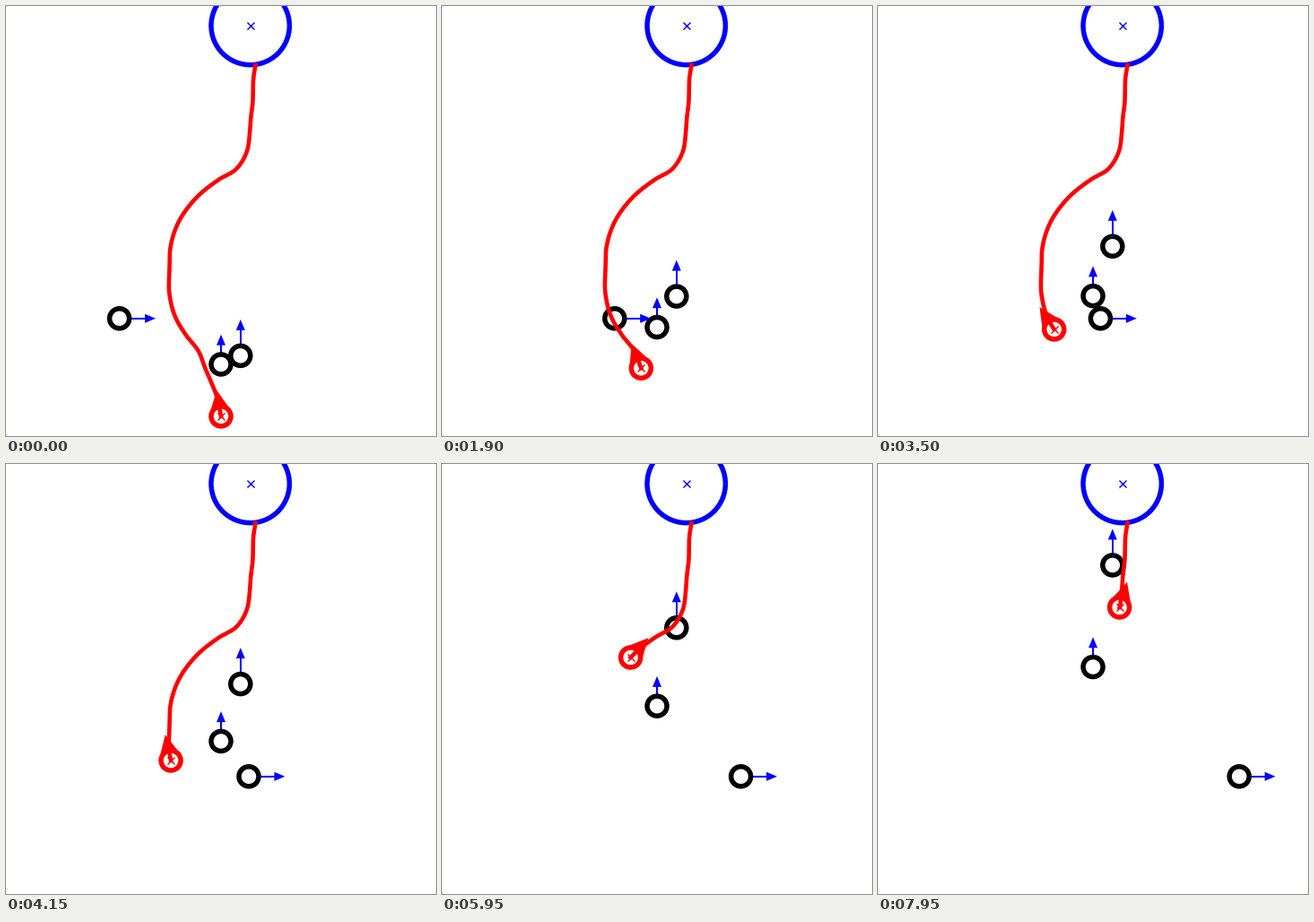
Animation, 480 px wide and 480 px high, one loop 8 s. Source, as a matplotlib script:

```python
import numpy as np
import matplotlib.pyplot as plt
from matplotlib.animation import FuncAnimation
from matplotlib.patches import Circle, Polygon

SIZE, DPI = 480, 100
PX = 72 / DPI
FRAMES, INTERVAL = 160, 50
RADIUS = 11

# Bends of the planned route, from the robot's start up to the goal
ROUTE = np.array([
    (240, 458), (237.6, 444), (222.3, 404.3), (215, 385.5), (201, 367.5),
    (188.5, 346), (182.5, 322), (182.6, 290), (183.2, 272), (191, 244.5),
    (211, 215.5), (238, 193.5), (257, 182), (268.5, 163.5), (272.2, 141),
    (273.2, 126), (275.2, 110), (276.5, 78), (278.5, 66)])

# The robot's changes of pace: time in frames, height reached
PACE_T, PACE_Y = np.array([
    (0, 458), (17, 438), (38, 404.3), (56, 383.3), (83, 331),
    (101, 278), (119, 216), (138, 187.3), (159, 160)]).T

# Obstacles: start and velocity per frame
MOVERS = [((240, 400), (0, -1.091)),
          ((261.8, 390.4), (0, -1.745)),
          ((126.6, 348.8), (1.74, 0))]


def hermite(x, xs, ys):
    """Smooth cubic curve through the points (xs, ys)."""
    slope = np.gradient(ys, xs)
    i = np.clip(np.searchsorted(xs, x, side="right") - 1, 0, len(xs) - 2)
    h = xs[i + 1] - xs[i]
    u = (x - xs[i]) / h
    return ((1 + 2 * u) * (1 - u) ** 2 * ys[i] + u * (1 - u) ** 2 * h * slope[i]
            + u * u * (3 - 2 * u) * ys[i + 1] + u * u * (u - 1) * h * slope[i + 1])


def lengths(pts):
    steps = np.hypot(*np.diff(pts, axis=0).T)
    return np.concatenate(([0], np.cumsum(steps)))


chord = lengths(ROUTE)
fine = np.linspace(0, chord[-1], 900)
path = np.column_stack([hermite(fine, chord, axis) for axis in ROUTE.T])
arc = lengths(path)
pace_s = np.interp(-PACE_Y, -path[:, 1], arc)
travel = hermite(np.arange(FRAMES), PACE_T, pace_s)


def at(s):
    return np.array([np.interp(s, arc, axis) for axis in path.T])


def head(pos, direction, tip, length, half):
    """Triangle whose tip lies at a distance from pos."""
    d = direction / np.hypot(*direction)
    side = np.array([-d[1], d[0]])
    base = pos + d * (tip - length)
    return np.array([pos + d * tip, base + side * half, base - side * half])


fig = plt.figure(figsize=(SIZE / DPI, SIZE / DPI), dpi=DPI, facecolor="white")
ax = fig.add_axes([0, 0, 1, 1])
ax.set(xlim=(0, SIZE), ylim=(SIZE, 0))
ax.axis("off")


def ring(pos, radius, color, z, fill="none"):
    return ax.add_patch(Circle(pos, radius, ec=color, fc=fill,
                               lw=5.5 * PX, zorder=z))


def triangle(color, z):
    return ax.add_patch(Polygon(np.zeros((3, 2)), fc=color, ec="none", zorder=z))


def cross(pos, color, z):
    return ax.plot(*pos, "x", color=color, ms=8 * PX, mew=1.4 * PX, zorder=z)[0]


ring((272.7, 22), 43.7, "blue", 1)
cross((273.2, 22.3), "blue", 1)

obstacles = []
for z, (start, vel) in enumerate(MOVERS, 2):
    shaft, = ax.plot([], [], color="blue", lw=2 * PX, zorder=z,
                     solid_capstyle="butt")
    obstacles.append((np.array(start), np.array(vel),
                      ring(start, RADIUS, "black", z, "white"),
                      shaft, triangle("blue", z)))

trail, = ax.plot([], [], color="red", lw=4.6 * PX, zorder=6,
                 solid_joinstyle="round")
robot = ring(ROUTE[0], RADIUS, "red", 7)
mark = cross(ROUTE[0], "red", 7)
nose = triangle("red", 7)


def update(i):
    for start, vel, body, shaft, point in obstacles:
        pos = start + vel * i
        speed = np.hypot(*vel)
        unit = vel / speed
        tip = 21.3 + 11 * speed
        body.center = pos
        shaft.set_data(*np.transpose([pos + unit * RADIUS, pos + unit * (tip - 9)]))
        point.set_xy(head(pos, vel, tip, 12, 5))

    s = travel[i]
    pos = at(s)
    trail.set_data(*np.vstack([pos, path[arc > s]]).T)
    robot.center = pos
    mark.set_data([pos[0]], [pos[1]])
    nose.set_xy(head(pos, at(s + 2) - at(s - 4), 29.5, 20.5, 10))


anim = FuncAnimation(fig, update, frames=FRAMES, init_func=lambda: update(0),
                     interval=INTERVAL, repeat=True, repeat_delay=0)
plt.show()
```
